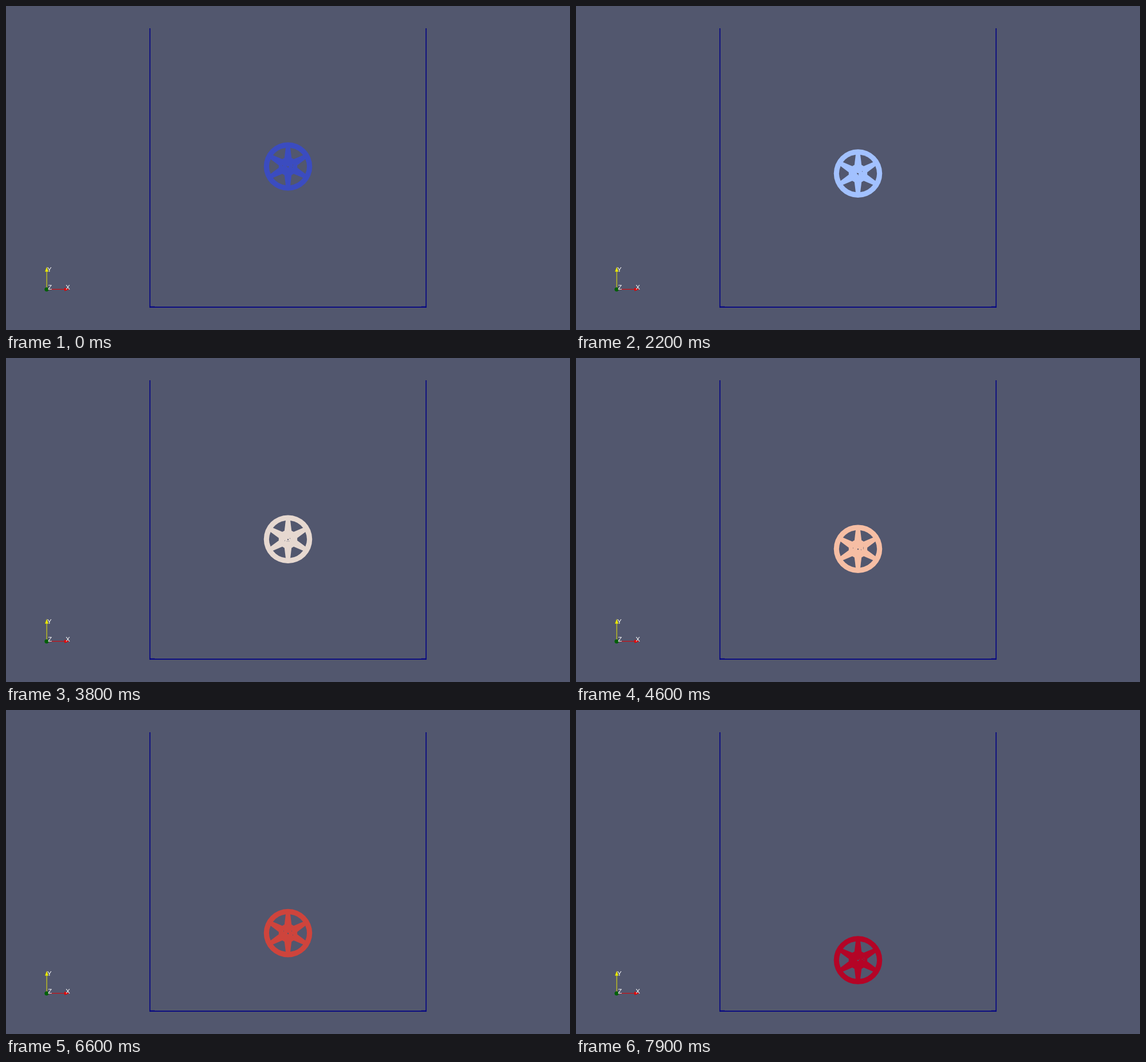
An HTML page with a canvas that plays this animation: 986x568 px, repeating every 8000 ms.

```html
<!DOCTYPE html>
<html lang="en">
<head>
<meta charset="utf-8">
<title>Falling wheel</title>
<style>
html, body { margin: 0; width: 100%; height: 100%; overflow: hidden; background: #52576e; }
canvas { display: block; }
</style>
</head>
<body>
<canvas id="stage" width="986" height="568"></canvas>
<script>
const ctx = document.getElementById('stage').getContext('2d');
const BG = 'rgb(82,87,110)';
const LOOP = 8000, STEP = 100;
const CX = 493, START_Y = 281.4, FALL = 2.518, TOP_SPEED_AT = 7.12;
const R_OUT = 42.3, R_IN = 33;

const mix = (a, b, t) => a + (b - a) * t;

// CIE Lab to an sRGB colour string
function labColor(L, a, b) {
  const cube = v => v > 6 / 29 ? v ** 3 : (v - 4 / 29) * 108 / 841;
  const f = (L + 16) / 116;
  const x = 0.9505 * cube(f + a / 500), y = cube(f), z = 1.089 * cube(f - b / 200);
  const channel = v => {
    const g = v > 0.0031308 ? 1.055 * v ** (1 / 2.4) - 0.055 : 12.92 * v;
    return Math.round(255 * Math.min(Math.max(g, 0), 1));
  };
  const r = channel(3.2406 * x - 1.5372 * y - 0.4986 * z);
  const g = channel(-0.9689 * x + 1.8758 * y + 0.0415 * z);
  const bl = channel(0.0557 * x - 0.204 * y + 1.057 * z);
  return `rgb(${r},${g},${bl})`;
}

// Blue to white to red, mixed in polar Lab (magnitude, saturation, hue)
function coolWarm(s) {
  const p = Math.min(Math.max(s, 0), 1) * 2 - 1;
  const k = Math.abs(p);
  const mag = mix(88, 80, k), sat = 1.08 * k;
  const hue = p < 0 ? mix(-1.661, -1.1, k) : mix(1.061, 0.5, k);
  const chroma = mag * Math.sin(sat);
  return labColor(mag * Math.cos(sat), chroma * Math.cos(hue), chroma * Math.sin(hue));
}

function seeded(seed) {
  return () => {
    seed = (seed * 16807) % 2147483647;
    return seed / 2147483647;
  };
}

function rect(color, x, y, w, h) {
  ctx.fillStyle = color;
  ctx.fillRect(x, y, w, h);
}

function disc(color, x, y, r) {
  ctx.fillStyle = color;
  ctx.beginPath();
  ctx.arc(x, y, r, 0, 2 * Math.PI);
  ctx.fill();
}

// Open box: one half is drawn, then mirrored
function drawBox() {
  const navy = 'rgb(0,0,132)';
  for (const side of [-1, 1]) {
    ctx.save();
    ctx.translate(CX, 0);
    ctx.scale(side, 1);
    rect(navy, 240.6, 39, 1.6, 490);
    rect(navy, 0, 527.1, 242, 1.7);
    rect(navy, 233, 526.6, 8, 1);
    ctx.restore();
  }
}

function drawArrow(color, angle) {
  ctx.save();
  ctx.translate(71.2, 496.7);
  ctx.rotate(angle);
  rect(color, 0, -0.5, 32, 1);
  ctx.beginPath();
  ctx.moveTo(39.5, 0);
  ctx.lineTo(31, 3);
  ctx.lineTo(31, -3);
  ctx.fill();
  ctx.restore();
}

function drawAxes() {
  drawArrow('rgb(232,232,0)', -Math.PI / 2);
  drawArrow('rgb(228,0,0)', 0);
  disc('rgb(0,96,8)', 71, 496.8, 3.6);
  ctx.fillStyle = '#fff';
  ctx.font = '11.5px "Liberation Sans", Arial, sans-serif';
  ctx.fillText('Y', 72, 466);
  ctx.fillText('Z', 73.3, 496.5);
  ctx.fillText('X', 104.3, 497.4);
}

// Gap between two spokes, which widen towards the hub
function drawHole(angle) {
  const half = 0.4;
  ctx.save();
  ctx.rotate(angle);
  ctx.beginPath();
  ctx.arc(0, 0, R_IN, -half, half);
  ctx.lineTo(16.2, 2.2);
  ctx.lineTo(16.2, -2.2);
  ctx.fill();
  ctx.restore();
}

function drawWheel(y, color, step) {
  ctx.save();
  ctx.translate(CX, y);
  disc(color, 0, 0, R_OUT);
  ctx.fillStyle = BG;
  for (let i = 0; i < 6; i++) drawHole(i * Math.PI / 3);

  // A stray grain, the axle, and small gaps shifting around the hub
  disc(color, -20, 14.5, 1.8);
  rect(BG, -1, -0.5, 2, 2);
  const rnd = seeded(step * 7919 + 101);
  for (let i = 0; i < 4; i++) {
    rect(BG, Math.round(rnd() * 22 - 10), Math.round(rnd() * 8 - 4), 1, 1);
  }
  ctx.restore();
}

function frame(now) {
  const step = Math.floor((now % LOOP) / STEP);
  const t = step * STEP / 1000;
  rect(BG, 0, 0, 986, 568);
  drawBox();
  drawAxes();
  drawWheel(START_Y + FALL * t * t, coolWarm(t / TOP_SPEED_AT), step);
  requestAnimationFrame(frame);
}

requestAnimationFrame(frame);
</script>
</body>
</html>
```
